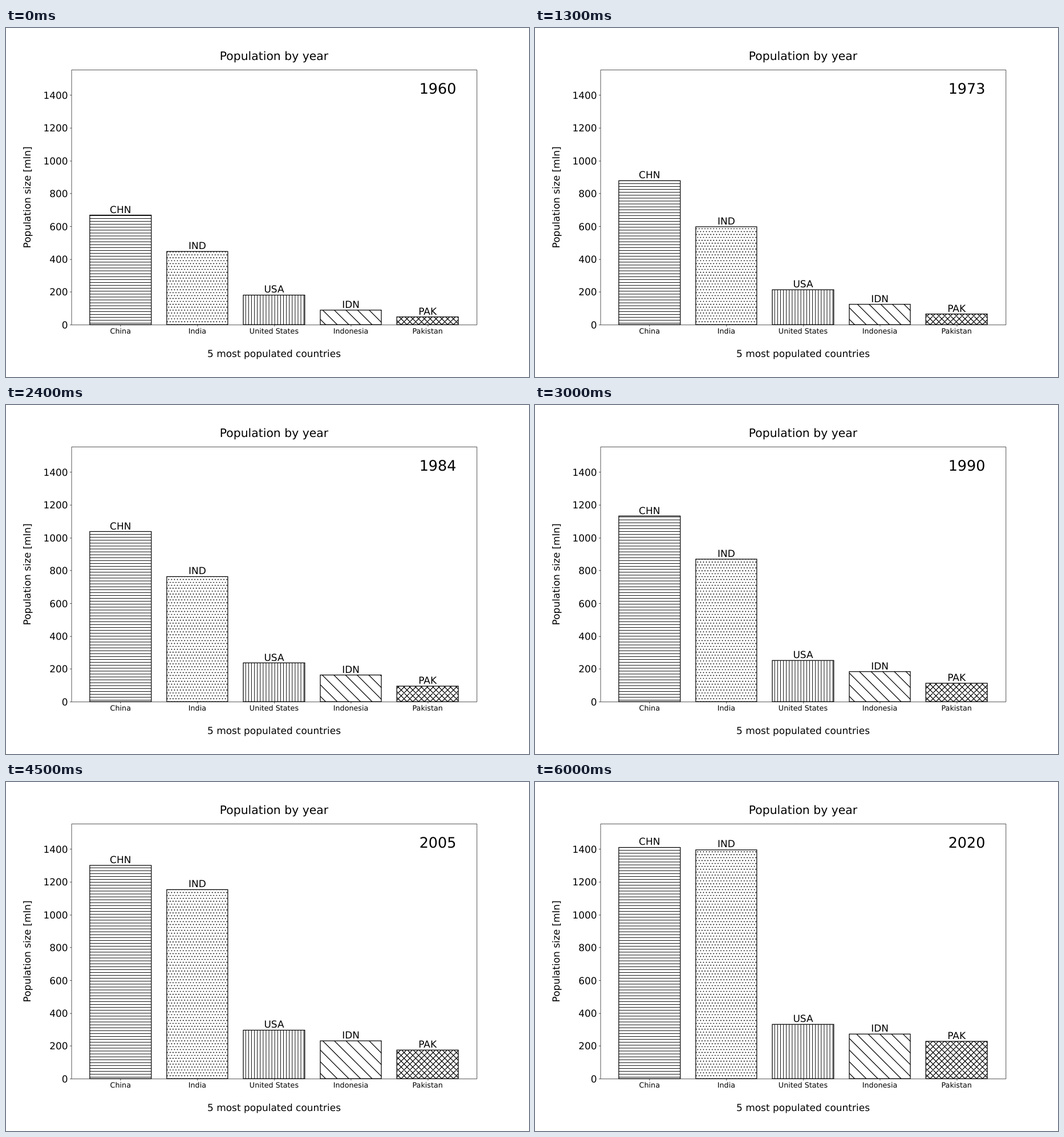
Recreate the animation shown at these times as an HTML page. Size 917x611 px, loop 6.1 s.

```html
<!DOCTYPE html>
<html lang="en">
<head>
<meta charset="utf-8">
<title>Population by year</title>
<style>
  html, body { margin: 0; width: 100%; height: 100%; overflow: hidden; background: #fff; }
  svg { display: block; width: 100%; height: 100%; }
  text { font-family: "DejaVu Sans", sans-serif; font-size: 20px; text-rendering: geometricPrecision; }
  path, .edge { fill: none; stroke: #000; stroke-width: 1.1; }
  .edge, .slant, .cross { stroke-width: 1.45; }
  .axis { stroke-width: .8; }
  .dots { stroke-width: 2.2; stroke-linecap: round; }
</style>
</head>
<body>
<svg viewBox="0 0 1080 720" preserveAspectRatio="none"></svg>
<script>
const svg = document.querySelector('svg');
const LEFT = 135, RIGHT = 972, TOP = 86.4, BASE = 612;
const UNIT = (BASE - TOP) / 1553.6;       // height of one million
const SLOT = (RIGHT - LEFT) / 5.28;
const FIRST = 1960, YEARS = 61, STEP = 100;
const SPAN = 12;                          // years between key values

// growth: millions per year at the start; keys: millions every SPAN years
const BARS = [
  { code: 'CHN', name: 'China', fill: 'rows', growth: -4, keys: [667, 862, 1037, 1217.5, 1324.7, 1411] },
  { code: 'IND', name: 'India', fill: 'dots', growth: 10.4, keys: [446, 582.8, 763, 982.5, 1206.7, 1396.4] },
  { code: 'USA', name: 'United States', fill: 'cols', growth: 3, keys: [180.7, 209.9, 235.8, 269.4, 304, 331.5] },
  { code: 'IDN', name: 'Indonesia', fill: 'slant', growth: 2.4, keys: [88.4, 121.2, 162, 201.4, 238.6, 271.9] },
  { code: 'PAK', name: 'Pakistan', fill: 'cross', growth: 1, keys: [46, 62.5, 93.6, 136, 186.9, 227.2] }
];

const snap = v => Math.floor(v + .5) + .5;

function add(parent, tag, attrs, text) {
  const el = document.createElementNS('http://www.w3.org/2000/svg', tag);
  for (const k in attrs) el.setAttribute(k, attrs[k]);
  if (text !== undefined) el.textContent = text;
  parent.append(el);
  return el;
}

function label(text, x, y, size = 20, anchor = 'middle', extra = {}) {
  return add(svg, 'text', { x, y, 'text-anchor': anchor, style: `font-size:${size}px`, ...extra }, text);
}

// Multiples of step between a and b, shifted by offset
function grid(a, b, step, offset = 0) {
  const list = [];
  for (let k = Math.floor((a - offset) / step); k * step + offset <= b + step; k++) list.push(k * step + offset);
  return list;
}

function hatch(kind, x0, x1) {
  const y0 = 126, y1 = 618, h = y1 - y0;
  const down = step => grid(x0 - y1, x1 - y0, step).map(c => `M${c + y0} ${y0}l${h} ${h}`);
  const up = step => grid(x0 + y0, x1 + y1, step).map(c => `M${c - y0} ${y0}l${-h} ${h}`);
  const parts = {
    rows: () => grid(y0, y1, 6, 3).map(y => `M${x0} ${y}H${x1}`),
    cols: () => grid(x0, x1, 6, 3).map(x => `M${x} ${y0}V${y1}`),
    dots: () => grid(y0, y1, 6).flatMap(y => grid(x0, x1, 6, y / 6 % 2 ? 3 : 0).map(x => `M${x} ${y}h0`)),
    slant: () => down(24),
    cross: () => [...down(12), ...up(12)]
  };
  return parts[kind]().join('');
}

// Growth over one span at key i
function slope({ growth, keys }, i) {
  const last = keys.length - 1;
  if (i === 0) return growth * SPAN;
  if (i < last) return (keys[i + 1] - keys[i - 1]) / 2;
  return 1.5 * keys[i] - 2 * keys[i - 1] + .5 * keys[i - 2];
}

// Smooth curve through the keys
function population(bar, age) {
  const { keys } = bar;
  const i = Math.min(Math.floor(age / SPAN), keys.length - 2);
  const t = age / SPAN - i, s = 1 - t;
  return keys[i] * s * s * (1 + 2 * t) + keys[i + 1] * t * t * (1 + 2 * s)
    + t * s * (s * slope(bar, i) - t * slope(bar, i + 1));
}

const defs = add(svg, 'defs', {});
BARS.forEach((bar, i) => {
  const left = LEFT + (i + .24) * SLOT, mid = LEFT + (i + .64) * SLOT;
  const x = Math.round(left), width = Math.round(left + .8 * SLOT) - x;
  const clip = add(add(defs, 'clipPath', { id: 'clip' + i }), 'rect', { x, width });
  const group = add(svg, 'g', { 'clip-path': `url(#clip${i})` });
  add(group, 'path', { d: hatch(bar.fill, x, x + width), class: bar.fill });
  bar.rects = [clip, add(svg, 'rect', { x, width, class: 'edge' })];
  bar.tag = label(bar.code, mid, 0);
  add(svg, 'path', { d: `M${snap(mid)} ${BASE + .5}v3.5`, class: 'axis' });
  label(bar.name, mid, 630.5, 15);
});

for (let v = 0; v <= 1400; v += 200) {
  const y = BASE - v * UNIT;
  add(svg, 'path', { d: `M${LEFT + .5} ${snap(y)}h-3.5`, class: 'axis' });
  label(v, 128, y + 7.7, 20, 'end');
}
add(svg, 'path', { d: `M${LEFT + .5} ${snap(TOP)}H${RIGHT + .5}V${BASE + .5}H${LEFT + .5}Z`, class: 'axis' });
label('Population by year', 553.5, 66.4, 24);
label('5 most populated countries', 553.5, 679.3);
label('Population size [mln]', 0, 0, 20, 'middle', { transform: 'translate(51.2 349.2) rotate(-90)' });
const yearLabel = label('', 929.8, 135.5, 30, 'end');

let shown = -1;
function draw(now) {
  const age = Math.floor(now / STEP) % YEARS;
  if (age === shown) return;
  shown = age;
  yearLabel.textContent = FIRST + age;
  for (const bar of BARS) {
    const top = BASE - population(bar, age) * UNIT, y = Math.round(top);
    for (const r of bar.rects) {
      r.setAttribute('y', y);
      r.setAttribute('height', BASE - y);
    }
    bar.tag.setAttribute('y', top - 4.7);
  }
}

const start = performance.now();
function tick() {
  draw(performance.now() - start);
  requestAnimationFrame(tick);
}
tick();
</script>
</body>
</html>
```
